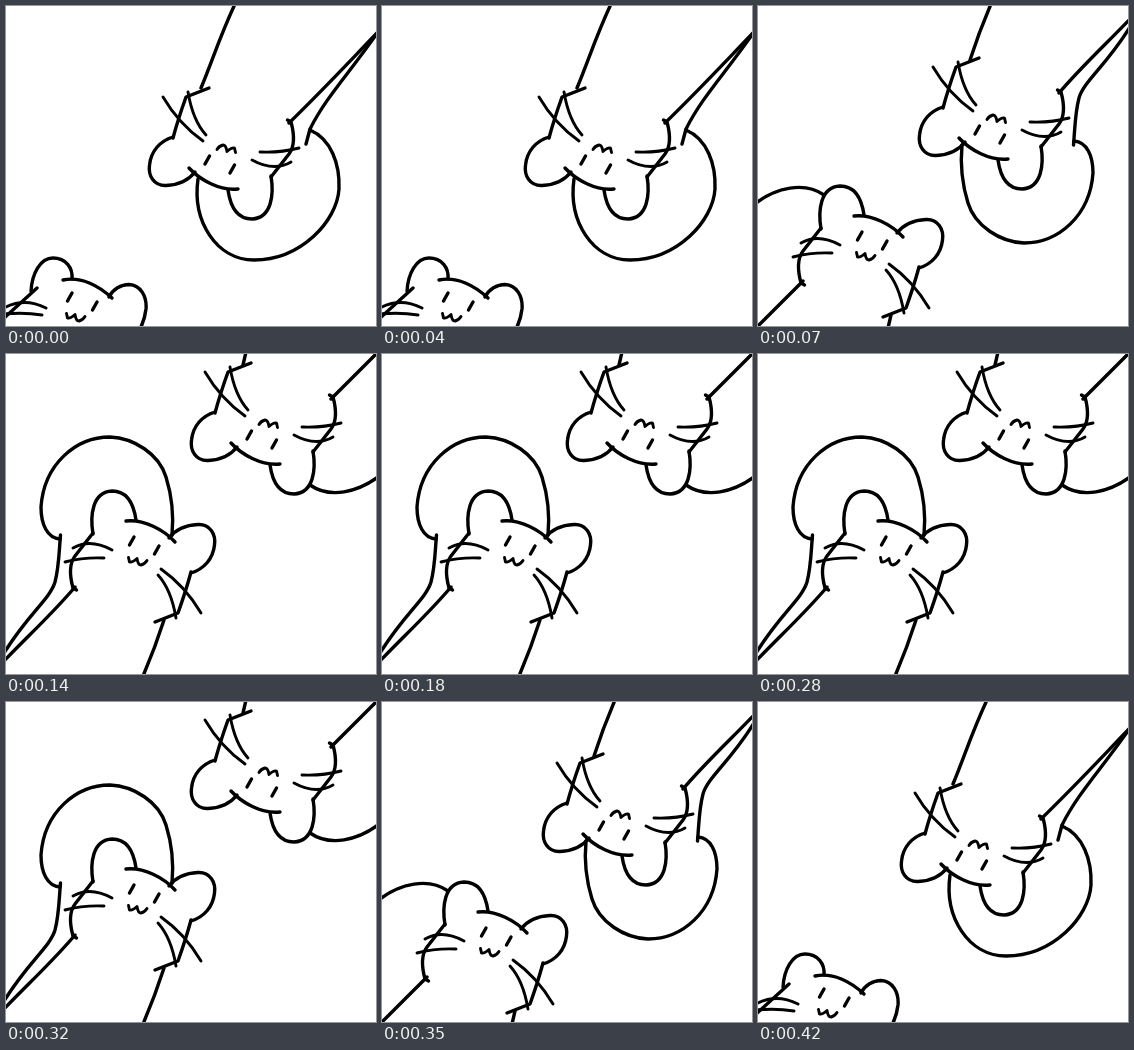
These frames come from a looping animation (370 px wide and 320 px high, 0.49 s). An HTML page:

```html
<!DOCTYPE html>
<html lang="en">
<head>
<meta charset="utf-8">
<title>Two mice</title>
<style>
  html, body { margin: 0; width: 100%; height: 100%; overflow: hidden; background: #fff; }
  svg { display: block; width: 370px; height: 320px; }
  path { fill: none; stroke: #000; stroke-width: 3.4; stroke-linecap: round; stroke-linejoin: round; }
  .thin { stroke-width: 2.9; }
</style>
</head>
<body>
<svg viewBox="0 0 370 320">
  <defs>
    <g id="face">
      <path d="M146 153L141.500 161M171 162L166.500 170"/>
      <path class="thin" d="M140.500 173.500L141.500 178Q144 179 149 174.500Q150 181 153 181Q157 180 159 176.500"/>
    </g>
    <g id="head">
      <use href="#face"/>
      <path d="M138 137C156 135 176 146 187 158"/>
      <path d="M105 150C102 132 104 108 124 107C140 107 146 122 148 136"/>
      <path d="M181 154C188 145 199 141 210 140.500C222 140 228 150 226.500 161C225 175 216 185 203 189"/>
      <path d="M105 149L87 172C81 180 82 193 85 204L88.500 206"/>
      <path d="M203 188C199 203 195 215 190 229L167 238"/>
      <path class="thin" d="M170 191C180 202 185 216 188 234M173 185C190 197 203 212 213 229"/>
      <path class="thin" d="M85 164Q102 154 124 166M77 178Q96 173 116 174"/>
    </g>
    <g id="pose0">
      <use href="#face" x="-80" y="134"/>
      <path d="M57 274C75 270 93 280 106 292"/>
      <path d="M25 285C26 268 34 252 47 252C60 252 67 262 66 273"/>
      <path d="M103 291C107 283 115 278.500 123 278.500C135 279 141 291 140 303Q139 312 135 321"/>
      <path d="M31 282L-2 312"/>
      <path class="thin" d="M-2 302Q18 291 40 302M-2 308Q18 306 36 309"/>
    </g>
    <g id="pose1">
      <use href="#head" x="-42" y="73"/>
      <path d="M-2 197C18 182 46 175 66 189"/>
      <path d="M45 275L-2 322M133 309L130 322"/>
    </g>
    <g id="pose2">
      <use href="#head" x="-18" y="30"/>
      <path d="M54 185C41 184 35 170 35 153C38 110 70 83 104 83C128 84 153 100 160 123C165 139 168 160 166 181"/>
      <path d="M54.500 181C53 198 53 213 49 228C44 245 22 260 -2 299"/>
      <path d="M69 233C48 258 23 281 -2 307M158 266Q149 294 137 322"/>
    </g>
    <g id="pose3">
      <use href="#head"/>
      <path d="M66 196C45 187 36 162 37 137C39 105 75 66 122 66C159 66 184 104 178 147"/>
      <path d="M70 182L66 197C50 229 28 251 -2 294"/>
      <path d="M87 203C54 235 27 264 -2 294M175 238C163 267 156 290 141 322"/>
    </g>
  </defs>
  <use id="lower" href="#pose0"/>
  <use id="upper" href="#pose3" transform="rotate(180 185 160)"/>
</svg>
<script>
  const STEP = 70;
  const poses = [0, 1, 2, 3, 2, 1, 0];
  const lower = document.getElementById('lower');
  const upper = document.getElementById('upper');
  let shown = -1;

  // The upper mouse ducks out as the lower one rises.
  function draw(time) {
    const pose = poses[Math.floor(time / STEP) % poses.length];
    if (pose === shown) return;
    shown = pose;
    lower.setAttribute('href', '#pose' + pose);
    upper.setAttribute('href', '#pose' + (3 - pose));
  }

  let start;
  function tick(now) {
    start ??= now;
    draw(now - start);
    requestAnimationFrame(tick);
  }
  requestAnimationFrame(tick);
</script>
</body>
</html>
```
